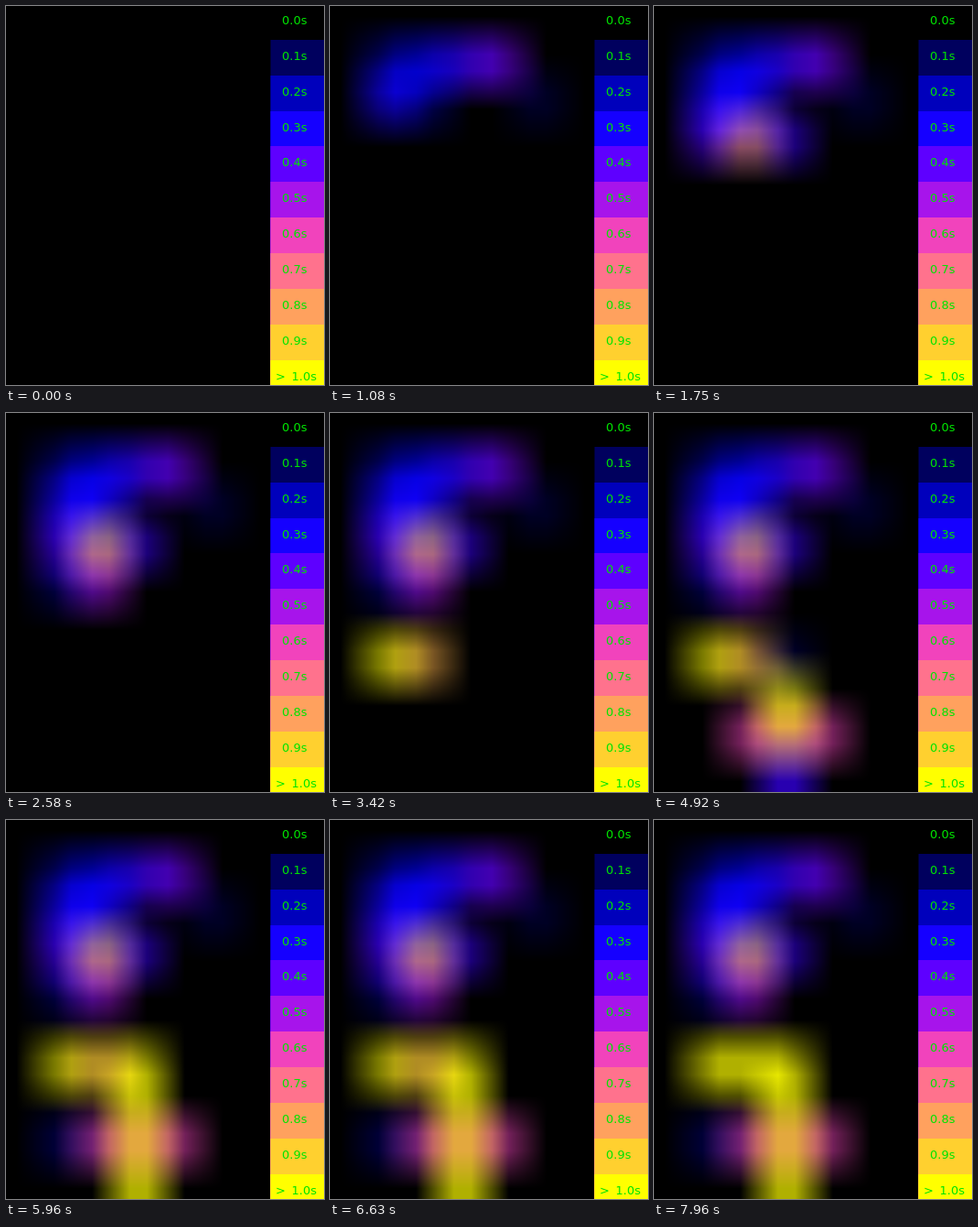
Animation of 348x414 px, one loop 8000 ms. Source, as an HTML page with a canvas:

```html
<!DOCTYPE html>
<html>
<head>
<meta charset="utf-8">
<title>Dwell time heatmap</title>
<style>
  html, body { margin: 0; width: 100%; height: 100%; overflow: hidden; background: #000; }
  canvas { display: block; }
</style>
</head>
<body>
<canvas id="stage" width="348" height="414"></canvas>
<script>
const LOOP = 8000, STEP = 40;
const MAP_W = 290, MAP_H = 414, COLS = 7, ROWS = 10, BLUR = 60;
const MS_PER_DWELL_SECOND = 300;
const ctx = document.getElementById('stage').getContext('2d');

const clamp = v => Math.min(1, Math.max(0, v));
const lerp = (a, b, t) => a + (b - a) * t;

// The route over the grid: cells are [column, row], dwell is in seconds.
const visits = [];
let clock = 0;
const waitUntil = ms => { clock = ms; };

function stay([col, row], seconds) {
  const length = seconds * MS_PER_DWELL_SECOND;
  visits.push({ cell: row * COLS + col, seconds, start: clock, length });
  clock += length;
}

function sweep(from, to, firstDwell, lastDwell = firstDwell) {
  const steps = Math.max(Math.abs(to[0] - from[0]), Math.abs(to[1] - from[1]));
  for (let n = 0; n <= steps; n++) {
    const t = n / steps;
    stay(from.map((v, axis) => lerp(v, to[axis], t)), lerp(firstDwell, lastDwell, t));
  }
}

waitUntil(560);
stay([5, 2], .08);
sweep([4, 1], [1, 1], .43, .17);
sweep([1, 2], [2, 2], .3);
stay([3, 3], .35);
stay([1, 3], .38);
waitUntil(1480);
sweep([2, 3], [2, 4], .9, .5);
stay([1, 4], .13);
waitUntil(2740);
sweep([2, 6], [1, 6], .84, 1);
waitUntil(3860);
sweep([2, 8], [4, 8], .6);
sweep([3, 8], [3, 9], .3, .35);
sweep([3, 7], [3, 6], 1);
stay([1, 8], .12);
stay([3, 9], .65);
waitUntil(6680);
stay([2, 6], .16);

// Black - blue - violet - pink - yellow ramp, full at one second.
function heat(seconds) {
  const x = .92 * clamp(seconds);
  const blue = x < .25 ? 4 * x : 1.84 - 2 * x;
  return [x / .32 - .78125, 2 * x - .84, blue].map(v => 255 * clamp(v));
}

// Share of the blur window at each pixel that falls on each cell;
// the border cells reach on beyond the edge.
function blurWeights(length, cells) {
  const size = length / cells;
  return Array.from({ length }, (_, p) => {
    const from = p + .5 - BLUR / 2, to = from + BLUR, list = [];
    for (let c = 0; c < cells; c++) {
      const low = c === 0 ? -BLUR : c * size;
      const high = c === cells - 1 ? length + BLUR : (c + 1) * size;
      const overlap = Math.min(to, high) - Math.max(from, low);
      if (overlap > 0) list.push([c, overlap / BLUR]);
    }
    return list;
  });
}

const weightsX = blurWeights(MAP_W, COLS);
const weightsY = blurWeights(MAP_H, ROWS);
const image = ctx.createImageData(MAP_W, MAP_H);

function drawMap(time) {
  const dwell = new Float32Array(COLS * ROWS);
  for (const { cell, seconds, start, length } of visits)
    dwell[cell] += seconds * clamp((time - start) / length);
  const colors = Array.from(dwell, heat);

  let i = 0;
  for (let y = 0; y < MAP_H; y++) {
    const line = Array.from({ length: COLS }, (_, col) => {
      const mix = [0, 0, 0];
      for (const [row, w] of weightsY[y])
        for (let k = 0; k < 3; k++) mix[k] += w * colors[row * COLS + col][k];
      return mix;
    });
    for (let x = 0; x < MAP_W; x++) {
      let r = 0, g = 0, b = 0;
      for (const [col, w] of weightsX[x]) {
        r += w * line[col][0];
        g += w * line[col][1];
        b += w * line[col][2];
      }
      image.data[i++] = r;
      image.data[i++] = g;
      image.data[i++] = b;
      image.data[i++] = 255;
    }
  }
  ctx.putImageData(image, 0, 0);
}

function drawLegend() {
  const pitch = 38.85, left = MAP_W - .5;
  ctx.font = '13px "DejaVu Sans", sans-serif';
  for (let n = 0; n <= 10; n++) {
    const top = Math.max(0, Math.floor(n * pitch - 1.5));
    ctx.fillStyle = `rgb(${heat(n / 10).map(Math.round)})`;
    ctx.fillRect(left, top, 59, MAP_H - top);
    ctx.fillStyle = '#00e400';
    const baseline = Math.round(20 + n * pitch);
    if (n === 10) ctx.fillText('>', 295, baseline);
    ctx.fillText((n / 10).toFixed(1) + 's', n === 10 ? 312.5 : 302, baseline);
  }
}

let shown = -1;
function frame() {
  const time = Math.floor(performance.now() % LOOP / STEP) * STEP;
  if (time !== shown) {
    drawMap(shown = time);
    drawLegend();
  }
  requestAnimationFrame(frame);
}

frame();
</script>
</body>
</html>
```
